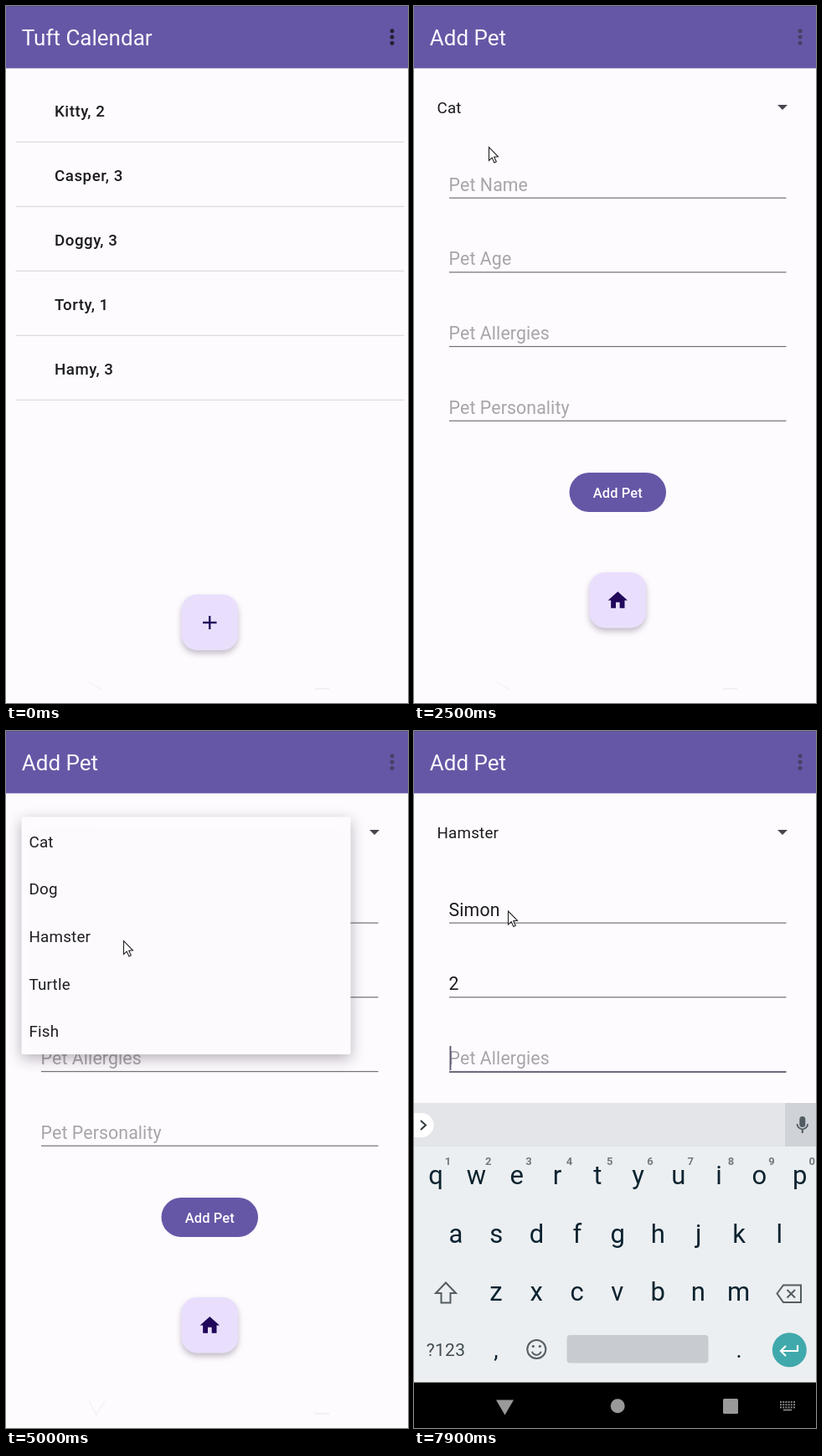
An HTML page with a canvas that plays this animation: 480 by 832 pixels, repeating every 8000 ms.

```html
<!DOCTYPE html>
<html lang="en">
<head>
<meta charset="utf-8">
<title>Pet list</title>
<style>
html, body { margin: 0; width: 100%; height: 100%; overflow: hidden; background: #fefbff; }
canvas { display: block; width: 480px; height: 832px; }
</style>
</head>
<body>
<canvas id="stage"></canvas>
<script>
const W = 480, H = 832, LOOP = 8000;
const PAPER = '#fefbff', INK = '#1c1b1f', PURPLE = '#6657a6', KEY = '#0b2330', GREY = '#535c62';
const NAV_TOP = 777.6;
const canvas = document.getElementById('stage');
const ctx = canvas.getContext('2d');
const dpr = window.devicePixelRatio || 1;
canvas.width = W * dpr;
canvas.height = H * dpr;

const clamp = v => Math.max(0, Math.min(1, v));
const progress = (t, start, length) => clamp((t - start) / length);
const easeOut = p => 1 - Math.pow(1 - p, 3);
const easeBoth = p => p * p * (3 - 2 * p);

function rect(x, y, w, h, color) {
  ctx.fillStyle = color;
  ctx.fillRect(x, y, w, h);
}

function round(x, y, w, h, r, color) {
  ctx.fillStyle = color;
  ctx.beginPath();
  ctx.roundRect(x, y, w, h, r);
  ctx.fill();
}

function disc(x, y, r, color) {
  ctx.fillStyle = color;
  ctx.beginPath();
  ctx.arc(x, y, r, 0, Math.PI * 2);
  ctx.fill();
}

function text(str, x, y, size, color, opt = {}) {
  ctx.font = `${opt.weight || 400} ${size}px Roboto, "Open Sans", sans-serif`;
  ctx.letterSpacing = (opt.gap || 0) + 'px';
  ctx.textAlign = opt.align || 'left';
  ctx.fillStyle = color;
  ctx.fillText(str, x, y);
}

function poly(points, closed) {
  ctx.beginPath();
  points.forEach(([x, y], i) => i ? ctx.lineTo(x, y) : ctx.moveTo(x, y));
  if (closed) ctx.closePath();
}

function stroke(points, color, width, closed) {
  poly(points, closed);
  ctx.strokeStyle = color;
  ctx.lineWidth = width;
  ctx.stroke();
}

function fill(points, color) {
  poly(points, true);
  ctx.fillStyle = color;
  ctx.fill();
}

function shadow(blur, dy, color, draw) {
  ctx.save();
  ctx.shadowBlur = blur * dpr;
  ctx.shadowOffsetY = dy * dpr;
  ctx.shadowColor = color;
  draw();
  ctx.restore();
}

function header(title, dots) {
  rect(0, 0, W, 74.4, PURPLE);
  rect(0, 0, W, 1, '#5d5293');
  text(title, 18.8, 46.7, 26, '#fbf8ff');
  [29.7, 37, 44.3].forEach(y => disc(461, y, 2.5, dots));
}

function fab(y) {
  shadow(7, 4, 'rgba(40,30,50,.28)', () => round(209.5, y, 67.5, 66.5, 18.5, '#e9dffd'));
}

function navGhost(wide) {
  const tone = '#f3f0f3';
  stroke(wide ? [[99, 800], [108, 816], [118, 800]] : [[99, 807], [115, 816]], tone, 1.3);
  stroke([[369, 815], [386, 815]], '#eeebee', 1.5);
}

function listScreen() {
  rect(0, 0, W, H + 20, PAPER);
  header('Tuft Calendar', '#261f33');
  ['Kitty, 2', 'Casper, 3', 'Doggy, 3', 'Torty, 1', 'Hamy, 3'].forEach((pet, i) => {
    text(pet, 58, 131.5 + i * 77, 18.7, INK, { weight: 500, gap: 0.55 });
    rect(11.5, 161.7 + i * 77, 464, 1.2, '#dcd9de');
  });
  fab(702.5);
  stroke([[235, 736], [251.5, 736]], '#21085a', 2.4);
  stroke([[243.2, 728], [243.2, 744]], '#21085a', 2.4);
  navGhost(false);
}

const homeIcon = new Path2D('M10 20v-6h4v6h5v-8h3L12 3 2 12h3v8z');

function field(i, hint, value, focused, composing) {
  const y = 220.5 + i * 88.7, x = 41.6;
  const opt = { gap: 0.1 };
  text(value || hint, x, y, 21.3, value ? INK : '#a8a4a9', opt);
  const end = value ? x + ctx.measureText(value).width : 43;
  rect(42, y + 8, 402.5, focused ? 2 : 1.2, focused ? '#6a6475' : '#747077');
  if (!focused) return;
  if (composing && value) rect(42, y + 1.8, end - 42, 1, '#55525a');
  rect(end - 0.5, y - 22, 1.9, 29, '#5f5870');
}

function formScreen(t) {
  rect(0, 0, W, H, PAPER);
  header('Add Pet', '#493f66');
  text(t < 5000 ? 'Cat' : 'Hamster', 27.5, 128, 18.8, INK, { gap: 0.2 });
  fill([[434, 118], [446, 118], [440, 124]], '#49454f');

  const typed = Math.floor(progress(t, 6250, 200) * 2) + (t >= 6250) + (t >= 6800) + (t >= 7000);
  const name = 'Simon'.slice(0, typed);
  const focus = t < 5780 ? -1 : t < 7200 ? 0 : t < 7800 ? 1 : 2;
  const values = [name, t >= 7500 ? '2' : '', '', ''];
  ['Name', 'Age', 'Allergies', 'Personality'].forEach((label, i) =>
    field(i, 'Pet ' + label, values[i], focus === i, i === 0));

  round(185.5, 557, 115.5, 47, 23.5, PURPLE);
  text('Add Pet', 243.3, 587, 16.4, '#fff', { weight: 500, gap: 0.12, align: 'center' });
  fab(676);
  ctx.save();
  ctx.translate(229.3, 695.5);
  ctx.scale(1.168, 1.168);
  ctx.fillStyle = '#21085a';
  ctx.fill(homeIcon);
  ctx.restore();
  navGhost(t > 5000);
}

function popup(t) {
  const alpha = progress(t, 3850, 150) * (1 - progress(t, 5000, 150));
  if (!alpha) return;
  ctx.save();
  ctx.globalAlpha = alpha;
  shadow(17, 5, 'rgba(30,25,35,.33)', () => round(18.5, 102.5, 393, 283.5, 2, PAPER));
  ['Cat', 'Dog', 'Hamster', 'Turtle', 'Fish'].forEach((kind, i) =>
    text(kind, 27.5, 138.6 + i * 56.7, 18.8, INK, { gap: 0.2 }));
  ctx.restore();
}

function keyRow(letters, x, y) {
  [...letters].forEach((c, i) => text(c, x + i * 48.3, y, 31, KEY, { align: 'center' }));
}

function suggestions(t) {
  rect(0, 444, W, 52, '#e3e5e8');
  round(-14, 456, 37.5, 29, 14.5, '#fff');
  stroke([[8, 465], [14, 470.5], [8, 476]], '#333a3e', 2);
  rect(443, 444, 37, 52, '#cfd3d7');
  round(460.3, 460, 7, 13, 3.5, GREY);
  ctx.beginPath();
  ctx.arc(463.8, 469, 6.3, 0, Math.PI);
  ctx.strokeStyle = GREY;
  ctx.lineWidth = 1.8;
  ctx.stroke();
  rect(462.8, 475, 2, 5, GREY);
  if (t < 6350 || t >= 7200) return;
  text('Si', 107, 478.5, 21, '#6b7377', { align: 'center' });
  text('So', 241.7, 478.5, 21, '#000', { weight: 700, align: 'center' });
  text('Since', 376.5, 478.5, 21, '#6b7377', { align: 'center' });
  rect(170.5, 457, 1, 29, '#c6cacd');
  rect(313.5, 457, 1, 29, '#c6cacd');
}

function keyboard(t) {
  rect(0, 444, W, 334, '#eceff1');
  suggestions(t);
  keyRow('qwertyuiop', 26, 541);
  [...'1234567890'].forEach((n, i) =>
    text(n, 40.5 + i * 48.3, 518, 13, '#74797d', { weight: 700, align: 'center' }));
  keyRow('asdfghjkl', 49.9, 610.5);
  keyRow('zxcvbnm', 97.9, 680);

  stroke([[38, 658.5], [50, 671], [43.5, 671], [43.5, 682.5], [32.5, 682.5], [32.5, 671], [26, 671]], GREY, 2, true);
  stroke([[433.5, 671.5], [441, 661.5], [462, 661.5], [462, 682], [441, 682]], GREY, 2, true);
  stroke([[445.5, 667], [455, 676.5]], GREY, 2);
  stroke([[455, 667], [445.5, 676.5]], GREY, 2);

  text('?123', 38, 746, 21, '#414b51', { align: 'center', gap: 0.3 });
  text(',', 98, 748, 27, KEY, { align: 'center' });
  text('.', 388, 748, 27, KEY, { align: 'center' });
  ctx.strokeStyle = GREY;
  ctx.lineWidth = 2;
  ctx.beginPath();
  ctx.arc(146.3, 738, 11, 0, Math.PI * 2);
  ctx.stroke();
  ctx.beginPath();
  ctx.arc(146.3, 739, 5.7, 0.3, Math.PI - 0.3);
  ctx.stroke();
  disc(142.3, 734.5, 1.6, GREY);
  disc(150.3, 734.5, 1.6, GREY);
  round(182.5, 721, 169, 33.5, 4, '#c8ccd1');
  disc(448.3, 738.8, 20.5, '#40a9ac');
  stroke([[458, 733], [458, 740], [438.5, 740]], '#fff', 2.2);
  stroke([[444, 734], [438, 740], [444, 746]], '#fff', 2.2);
}

function navBar() {
  const tone = '#999';
  rect(0, NAV_TOP, W, H - NAV_TOP, '#000');
  fill([[98, 798.5], [119, 798.5], [108.5, 816.5]], tone);
  disc(243.2, 805.7, 8.5, tone);
  round(369, 797, 18, 18, 1.5, tone);
  for (let row = 0; row < 3; row++)
    for (let i = 0; i < 6; i++) rect(437 + i * 3.2, 800 + row * 3.2, 2, 2, '#858585');
  rect(441, 809.6, 10, 1.8, '#858585');
}

// time, x, y of the pointer tip
const route = [
  [300, 252, 836], [1000, 240, 738], [1780, 240, 738], [2100, 182.5, 387.5],
  [2500, 89.5, 168.5], [3100, 72, 124], [4000, 72, 124], [4350, 140.5, 250.5],
  [5100, 140.5, 250.5], [5500, 112.5, 215], [LOOP, 112.5, 215]
];

function pointer(t) {
  if (t < route[0][0]) return;
  const i = route.findIndex(k => k[0] > t);
  const [t0, x0, y0] = route[i - 1], [t1, x1, y1] = route[i];
  const p = easeBoth(progress(t, t0, t1 - t0));
  ctx.save();
  ctx.translate(x0 + (x1 - x0) * p, y0 + (y1 - y0) * p);
  const shape = [[0, 0], [0, 16], [3.7, 12.6], [6.4, 18.4], [8.8, 17.3], [6.2, 11.7], [11, 11.3]];
  fill(shape, '#fff');
  stroke(shape, '#222', 1.1, true);
  ctx.restore();
}

function openForm(t) {
  const e = Math.sin(progress(t, 2063, 400) * Math.PI / 2);
  if (e < 1) {
    rect(0, 0, W, H, PAPER);
    ctx.save();
    ctx.translate(0, -16.6 * Math.pow(e, 1.5));
    listScreen();
    ctx.restore();
    rect(0, 0, W, H, `rgba(20,0,40,${Math.min(0.1, 0.35 * e)})`);
  }
  if (!e) return;
  const top = H * (1 - e);
  ctx.save();
  ctx.beginPath();
  ctx.rect(0, top, W, H - top);
  ctx.clip();
  rect(0, top, W, H - top, PAPER);
  ctx.translate(0, 34 * (1 - e * e));
  formScreen(t);
  ctx.restore();
}

function draw(t) {
  ctx.setTransform(dpr, 0, 0, dpr, 0, 0);
  openForm(t);
  popup(t);
  const rise = easeOut(progress(t, 6000, 220));
  if (rise) {
    ctx.save();
    ctx.beginPath();
    ctx.rect(0, 0, W, 778);
    ctx.clip();
    ctx.translate(0, 334 * (1 - rise));
    keyboard(t);
    ctx.restore();
    navBar();
  }
  pointer(t);
}

const begin = performance.now();
function tick() {
  draw((performance.now() - begin) % LOOP);
  requestAnimationFrame(tick);
}
tick();
</script>
</body>
</html>
```
